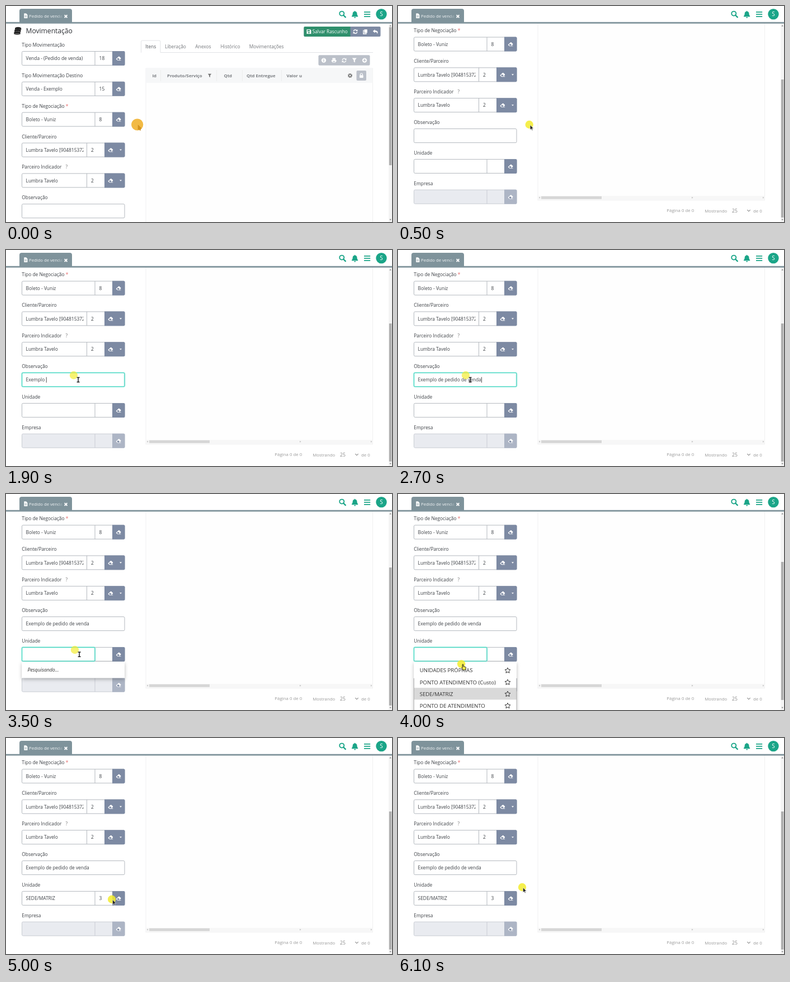
Recreate the animation shown at these times as an HTML page. Size 690 by 388 pixels, loop 6400 ms.

```html
<!DOCTYPE html>
<html lang="pt-BR">
<head>
<meta charset="utf-8">
<title>Movimentação</title>
<style>
html, body { margin: 0; width: 100%; height: 100%; overflow: hidden; background: #fff; }
svg { display: block; width: 690px; height: 388px; font-family: "Open Sans", "Noto Sans", sans-serif; }
text { white-space: pre; }
</style>
</head>
<body>
<svg id="stage" viewBox="0 0 690 388" xmlns="http://www.w3.org/2000/svg"></svg>
<script>
const LOOP = 6400, STEP = 100, SCROLL = 135.2, PITCH = 54.85;
const INK = '#3d4146', SLATE = '#7d8aa3', PALE = '#bbc0c9', GREEN = '#1ba588', STEEL = '#7f939b';
const NOTE = 'Exemplo de pedido de venda';

const text = (x, y, s, size = 8.4, fill = INK, more = '') =>
  `<text x="${x}" y="${y}" font-size="${size}" fill="${fill}" ${more}>${s}</text>`;
const rect = (x, y, w, h, fill, more = '') =>
  `<rect x="${x}" y="${y}" width="${w}" height="${h}" fill="${fill}" ${more}/>`;
const path = (d, fill = 'none', more = '') => `<path d="${d}" fill="${fill}" ${more}/>`;
const line = (d, stroke, width = 1, more = '') =>
  path(d, 'none', `stroke="${stroke}" stroke-width="${width}" ${more}`);
const at = (x, y, body, scale = 1) => `<g transform="translate(${x} ${y}) scale(${scale})">${body}</g>`;
const group = (id, body, more = '') => `<g id="${id}" ${more}>${body}</g>`;

// Icons, each drawn around 0,0
const icon = {
  eraser: path('M-4.3 .8 L-.3 -3 Q.6 -3.8 1.5 -3 L3.9 -.8 Q4.6 0 3.9 .8 L1.4 3 H4.2 V3.8 H-2 L-4.3 1.8 Q-4.8 1.3 -4.3 .8Z', '#fff') +
    path('M-3 1.3 L-.9 -.7 L1.8 1.8 L.5 3 H-1.4Z', SLATE),
  caret: path('M-2 -1 H2 L0 1.3Z', '#fff'),
  copy: rect(-2, -4, 5.5, 6.4, '#fff', 'rx=".7"') + line('M-2.6 -2 H-3.5 V4 H1.6 V2.8', '#fff', 1.3),
  undo: path('M-4.5 -.8 L-.7 -4 V-2 Q4.4 -2 4.2 1.5 Q4.2 3 2.8 4 Q3.6 .5 -.7 .5 V2.4Z', '#fff'),
  sync: line('M-3.3 -.6 A3.4 3.4 0 0 1 2.7 -2 M3.3 .6 A3.4 3.4 0 0 1 -2.7 2', '#fff', 1.4) +
    path('M4 -4 V-.7 H.7Z M-4 4 V.7 H-.7Z', '#fff'),
  save: path('M-4 -4 H2.4 L4 -2.4 V4 H-4Z M-2.7 -2.7 V-.6 H1.8 V-2.7Z M0 .4 A1.4 1.4 0 1 0 .01 .4Z', '#fff', 'fill-rule="evenodd"'),
  info: '<circle r="4.2" fill="#fff"/>' + rect(-.7, -.7, 1.4, 3.2, PALE) + rect(-.7, -2.7, 1.4, 1.3, PALE),
  plus: '<circle r="4.2" fill="#fff"/>' + line('M-2.5 0 H2.5 M0 -2.5 V2.5', PALE, 1.3),
  print: path('M-2.8 -4 H2 L2.8 -3.2 V-.8 H-2.8Z M-4.2 -.5 H4.2 V2.6 H2.8 V4 H-2.8 V2.6 H-4.2Z M-1.8 1.3 V3 H1.8 V1.3Z', '#fff', 'fill-rule="evenodd"'),
  filter: c => path('M-4 -4 H4 L1.1 -.3 V4 L-1.1 2.5 V-.3Z', c),
  lock: rect(-3.3, -.8, 6.6, 4.8, '#fff', 'rx=".8"') + line('M-2 -.5 V-2 A2 2 0 0 1 2 -2 V-.5', '#fff', 1.2),
  gear: '<circle r="2.3" fill="none" stroke="#777" stroke-width="1.7"/>' +
    '<circle r="3.5" fill="none" stroke="#777" stroke-width="1.2" stroke-dasharray="1.4 1.35"/>',
  star: path([...Array(10).keys()].map(i => {
    const r = i % 2 ? 2.5 : 5.2, a = i * Math.PI / 5;
    return (i ? 'L' : 'M') + (r * Math.sin(a)).toFixed(2) + ' ' + (-r * Math.cos(a)).toFixed(2);
  }).join('') + 'Z', 'none', 'stroke="#333" stroke-width="1" stroke-linejoin="round"')
};

// One labelled form row; cuts are the x positions of its inner borders
function field(i, label, value, code, opt = {}) {
  const mid = 94 + PITCH * i, top = mid - 12.5;
  const cuts = opt.menu ? [144.5, 176] : [159, 190];
  const edge = opt.off ? '#c9cdd4' : '#b3b8be';
  let s = text(28.3, mid - 21, label);
  s += rect(28.5, top, 183.5, 25, opt.off ? '#e9ebf0' : '#fff', `rx="2" stroke="${edge}"`);
  if (opt.wide) return s;
  const [a, b] = cuts;
  s += line(`M${a} ${top}v25`, edge);
  s += path(`M${b} ${top - .5}H210.5q2 0 2 2v22q0 2-2 2H${b}Z`, opt.off ? '#adb5c5' : SLATE);
  s += at(opt.menu ? 187 : 201.3, mid, icon.eraser);
  if (opt.menu) s += at(205, mid, icon.caret);
  return s + text(35.6, mid + 3.2, value, 8.4, INK, opt.menu ? 'clip-path="url(#cell)"' : '') +
    text(a + 7.6, mid + 3.2, code);
}

const form = [
  field(0, 'Tipo Movimentação', 'Venda - (Pedido de venda)', '18'),
  field(1, 'Tipo Movimentação Destino', 'Venda - Exemplo', '15'),
  field(2, 'Tipo de Negociação <tspan fill="#d33" fill-opacity=".75">*</tspan>', 'Boleto - Vuniz', '8'),
  field(3, 'Cliente/Parceiro', 'Lumbra Tavelo [904815372', '2', { menu: 1 }),
  field(4, 'Parceiro Indicador  <tspan dx="2.5" fill="#777">?</tspan>', 'Lumbra Tavelo', '2', { menu: 1 }),
  field(5, 'Observação', '', '', { wide: 1 }),
  field(6, 'Unidade', '', ''),
  field(7, 'Empresa', '', '', { off: 1 })
].join('');

const heading =
  [47.5, 43.5, 39.8].map((y, i) =>
    `<ellipse cx="${20 + i * .8}" cy="${y}" rx="5.6" ry="2" fill="#222"/>` +
    rect(14.4 + i * .8, y, 11.2, 1.6, '#222') + line(`M${14.4 + i * .8} ${y + 2}q5.6 2.6 11.2 0`, '#222', 1.6)).join('') +
  text(35.5, 49, 'Movimentação', 12.1, '#2b2e33', 'font-weight="500"') +
  rect(532.5, 37, 137, 18, SLATE, 'rx="2"') +
  path('M534.5 37H615.5V55H534.5q-2 0-2-2V39q0-2 2-2Z', '#2f8f6c') +
  at(541.5, 46, icon.save) + text(547.7, 49.2, 'Salvar Rascunho', 8.25, '#fff') +
  at(624.5, 46, icon.sync) + at(642.3, 46, icon.copy) + at(660.3, 46, icon.undo);

const tabs =
  line('M241 83.5H241.5V64q0-2 2-2H274q2 0 2 2V83.5H656', '#e1e3e6') +
  [[249, 'Itens'], [284, 'Liberação'], [338.3, 'Anexos'], [383.6, 'Histórico'], [434.8, 'Movimentações']]
    .map(([x, s], i) => text(x, 76, s, 8.4, i ? '#74777b' : '#55595e')).join('');

const table =
  rect(558.5, 88.3, 92, 18.5, PALE, 'rx="2"') +
  [icon.info, icon.print, icon.sync, icon.filter('#fff'), icon.plus]
    .map((g, i) => at(568 + i * 18.25, 97.6, g)).join('') +
  rect(250, 112, 405.5, 372, '#fefefe', 'stroke="#f0f0f1"') +
  rect(250, 112, 405.5, 26, '#f6f7f8') +
  [[261.5, 'Id'], [288, 'Produto/Serviço'], [389.5, 'Qtd'], [430, 'Qtd Entregue'], [501.5, 'Valor u']]
    .map(([x, s]) => text(x, 128, s, 7.8, '#7b7e82', 'font-weight="700"')).join('') +
  line('M276.5 115v20M376.5 115v20M422.5 115v20M492.5 115v20', '#eceded') +
  at(364, 125, icon.filter('#777'), .8) + at(615, 125, icon.gear) +
  rect(626.5, 116, 17.5, 18, PALE, 'rx="2"') + at(635.3, 125, icon.lock) +
  rect(250, 476.3, 405.5, 6.5, '#f7f7f7') + rect(256, 477, 108, 5, '#d6d6d6') +
  path('M525 478l2.8 1.5-2.8 1.5Z M652 478l2.5 1.5-2.5 1.5Z M254 478l-2.5 1.5 2.5 1.5Z', '#c4c4c4') +
  text(480.3, 505.6, 'Página 0 de 0', 7.85, '#999') + text(548.3, 506, 'Mostrando', 7.8, '#999') +
  text(597, 506, '25', 8.7, '#888') + line('M624.3 501.3l2.7 2.7 2.7-2.7', '#888', 1.1) +
  text(635, 506, 'de 0', 7.8, '#999');

const header =
  rect(0, 0, 690, 30, '#fff') + rect(0, 28.8, 690, 2.8, STEEL) +
  path('M24 30V9q0-4 4-4H114q4 0 4 4V30Z', STEEL) +
  path('M32.3 13.3H36L38.4 15.7V22H32.3Z', '#fff') + line('M33.6 17.6h3.4M33.6 19.6h3.4', STEEL, .8) +
  text(41, 20.8, 'Pedido de venda', 7.7, '#f2f5f6') + rect(90, 10, 13, 16, 'url(#fade)') +
  line('M104.6 16.2l4.8 4.8M109.4 16.2l-4.8 4.8', '#fff', 1.9) +
  `<circle cx="600.3" cy="13.6" r="4" fill="none" stroke="${GREEN}" stroke-width="1.9"/>` +
  line('M603.2 16.5l3.6 3.6', GREEN, 2.4, 'stroke-linecap="round"') +
  path('M618 18.3q1.7-1.5 1.7-4.5q0-3.3 3.2-4v-1h1.4v1q3.2.7 3.2 4q0 3 1.7 4.5v.9H618Z M622 20h3.4a1.7 1.5 0 0 1-3.4 0Z', GREEN) +
  line('M640 10.9h11.2M640 14.9h11.2M640 18.9h11.2', GREEN, 1.7) +
  `<circle cx="671" cy="14.6" r="9.7" fill="${GREEN}"/>` +
  text(671, 18.2, 'S', 10, '#fff', 'text-anchor="middle"');

const glow = (x, y, w) =>
  rect(x, y, w, 25, 'none', 'rx="2" stroke="#8ff0e1" stroke-width="2.6" stroke-opacity=".6"') +
  rect(x, y, w, 25, 'none', 'rx="2" stroke="#45d3bf"');

const live =
  group('noteFocus', glow(28.5, 220.5, 183.5)) + group('unitFocus', glow(28.5, 275.4, 130.5)) +
  text(35.6, 236.3, '', 8.4, INK, 'id="note"') + rect(0, 228.3, .8, 10, '#222', 'id="bar"') +
  group('unit', text(35.6, 291.1, 'SEDE/MATRIZ') + text(166.6, 291.1, '3')) +
  group('wait', rect(28.5, 301.5, 183.5, 29, '#fff', 'filter="url(#shade)"') +
    text(38.5, 319.3, 'Pesquisando...', 8.8, '#333', 'font-style="italic"')) +
  group('list', rect(28.5, 301.5, 183.5, 100, '#fff', 'filter="url(#shade)"') +
    rect(28.5, 348.2, 183.5, 21.2, '#d9d9d9') +
    ['UNIDADES PRÓPRIAS', 'PONTO ATENDIMENTO (Custo)', 'SEDE/MATRIZ', 'PONTO DE ATENDIMENTO']
      .map((s, i) => text(38.7, 320.4 + i * 21.1, s, 9.6, '#333') + at(196, 317.2 + i * 21.1, icon.star)).join('') +
    line('M28.5 331V388M212 331V388', '#999', .7));

const caps =
  rect(322, 7.5, 46, 45.5, '#8d8d8d', 'rx="2"') + rect(332.5, 25, 25.5, 22, '#fff', 'rx="3"') +
  line('M337 26V21a8 7.2 0 0 1 16 0v2', '#fff', 4) +
  text(345.2, 42, 'a', 19, '#777', 'text-anchor="middle" font-weight="600"');

const pointer =
  '<circle id="halo"/>' +
  group('arrow', path('M1.5 .8V9.4L3.5 7.6L4.9 10.6L6.2 10L4.8 7.1H7.5Z', '#222', 'id="tip" stroke="#fff" stroke-width=".5"')) +
  group('beam', line('M5.6 4h5M5.6 12.2h5M8.1 4v8.2', '#222', 1.5)) +
  group('hand', path('M2 .8q1-.8 1.7.2V4.4l3.6.8q1.2.3 1 1.6l-.7 4H3.2L.6 7.2q.2-1.2 1.4-.4Z', '#f4e94c', 'stroke="#222" stroke-width="1"'));

const stage = document.getElementById('stage');
stage.innerHTML =
  `<defs>
    <clipPath id="view"><rect x="0" y="31" width="690" height="357"/></clipPath>
    <clipPath id="cell"><rect x="30" y="240" width="108.5" height="100"/></clipPath>
    <linearGradient id="fade"><stop stop-color="${STEEL}" stop-opacity="0"/><stop offset="1" stop-color="${STEEL}"/></linearGradient>
    <filter id="shade" x="-10%" y="-30%" width="120%" height="180%"><feDropShadow dx="0" dy="2.5" stdDeviation="3" flood-opacity=".28"/></filter>
  </defs>` +
  `<g clip-path="url(#view)">${group('page', heading + form + tabs + table)}${live}</g>` +
  rect(684, 32, 6, 356, '#f4f4f4') + rect(684.8, 0, 4.6, 248, '#afafaf', 'id="thumb"') +
  path('M685.4 36.5l1.7-2.4 1.7 2.4Z M685.4 382.8l1.7 2.4 1.7-2.4Z', '#888') +
  header + group('caps', caps) + group('pointer', pointer);

const el = {};
for (const n of stage.querySelectorAll('[id]')) el[n.id] = n;
const show = (id, on) => el[id].setAttribute('visibility', on ? 'visible' : 'hidden');
const set = (id, attrs) => { for (const k in attrs) el[id].setAttribute(k, attrs[k]); };

// Keys: [time, value, ...]; linear between them unless an ease is given
function along(keys, t, col = 1, ease = u => u) {
  if (t <= keys[0][0]) return keys[0][col];
  for (let i = 1; i < keys.length; i++) {
    const [a, b] = [keys[i - 1], keys[i]];
    if (t <= b[0]) return a[col] + (b[col] - a[col]) * ease((t - a[0]) / (b[0] - a[0]));
  }
  return keys[keys.length - 1][col];
}
const smooth = u => u * u * (3 - 2 * u);
const within = (t, a, b) => t >= a && t < b;

const MOVE = [[0, 234.7, 213], [500, 234.7, 213], [900, 121, 225], [2800, 121, 225], [3200, 123, 280],
  [3800, 123, 280], [4300, 95, 352], [4600, 95, 352], [5200, 222, 268]];
const TYPED = [[1000, 0], [1100, 1], [1600, 7], [1800, 7], [2500, 20], [2700, 26]];
const PAGE = [[200, 0], [500, 1]];

function draw(ms) {
  const t = Math.floor((ms % LOOP) / STEP) * STEP;
  const s = along(PAGE, t, 1, smooth);
  const wait = within(t, 3300, 3800), list = within(t, 3800, 4700);
  const writing = within(t, 1000, 3200);

  set('page', { transform: `translate(0 ${-SCROLL * s})` });
  set('thumb', { y: list ? 122 : 38 + 94 * s });

  el.note.textContent = NOTE.slice(0, Math.floor(along(TYPED, t) + 1e-6));
  set('bar', { x: 35.9 + el.note.getComputedTextLength() });
  show('bar', writing && !within(t, 1700, 1900));
  show('noteFocus', writing);
  show('unitFocus', within(t, 3200, 4700));
  show('wait', wait);
  show('list', list);
  show('unit', t >= 5000);
  show('caps', within(t, 1000, 1600));

  const x = along(MOVE, t, 1, smooth), y = along(MOVE, t, 2, smooth);
  const press = t < 100 || within(t, 900, 1000) || within(t, 3200, 3300) || within(t, 4500, 4600);
  const beam = within(t, 800, 2900) || within(t, 3100, 3900);
  const hand = within(t, 4000, 4700);
  set('pointer', { transform: `translate(${x} ${y})` });
  set('halo', { r: press ? 10.6 : 7.2, fill: press ? '#f0b02a' : '#f3ec2e', 'fill-opacity': press ? .88 : beam ? .68 : .85 });
  set('tip', { fill: press ? '#d9961b' : '#222', stroke: press ? '#b87c14' : '#fff' });
  show('beam', beam);
  show('hand', hand);
  show('arrow', !beam && !hand);
}

const start = performance.now();
function tick() {
  draw(performance.now() - start);
  requestAnimationFrame(tick);
}
draw(0);
tick();
</script>
</body>
</html>
```
